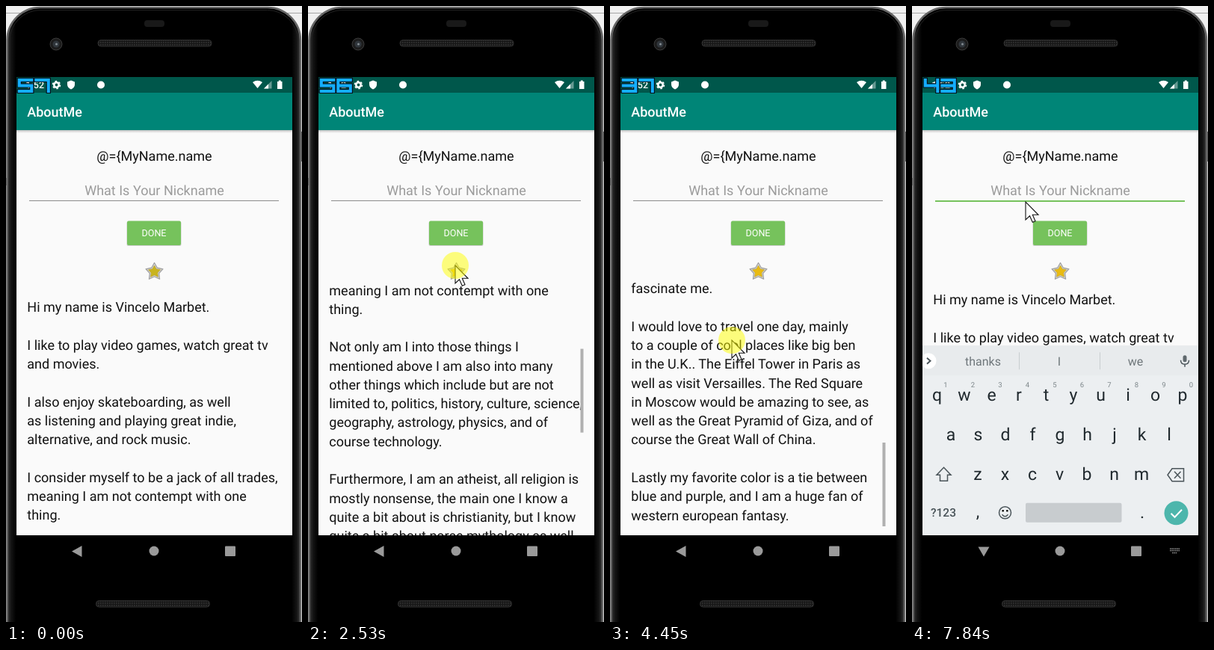
An HTML page that plays this animation: 396x824 px, repeating every 8000 ms.

```html
<!DOCTYPE html>
<html lang="en">
<head>
<meta charset="utf-8">
<title>AboutMe</title>
<style>
html, body { margin: 0; width: 100%; height: 100%; overflow: hidden; background: #f0f0f0; }
svg { display: block; width: 396px; height: 824px; }
text { font-family: Roboto, sans-serif; font-size: 18.02px; text-rendering: geometricPrecision; white-space: pre; }
.mid { text-anchor: middle; }
#keys text { text-anchor: middle; fill: #20292e; font-size: 23px; }
#keys .alt { font-size: 9.5px; fill: #7d868a; }
#keys .word { font-size: 16px; fill: #6f777b; }
#keys .icon { fill: none; stroke: #4a5459; stroke-width: 1.5; }
#count path { fill: none; vector-effect: non-scaling-stroke; stroke-linecap: square; stroke-linejoin: miter; }
</style>
</head>
<body>
<svg viewBox="0 0 396 824" xmlns="http://www.w3.org/2000/svg">
  <defs>
    <linearGradient id="body">
      <stop offset="0" stop-color="#3c3c3c"/>
      <stop offset=".012" stop-color="#161616"/>
      <stop offset=".03" stop-color="#000"/>
      <stop offset=".97" stop-color="#000"/>
      <stop offset=".988" stop-color="#161616"/>
      <stop offset="1" stop-color="#3c3c3c"/>
    </linearGradient>
    <linearGradient id="shade" x2="0" y2="1">
      <stop offset="0" stop-opacity=".22"/>
      <stop offset="1" stop-opacity="0"/>
    </linearGradient>
    <pattern id="mesh" width="3" height="3" patternUnits="userSpaceOnUse">
      <rect width="3" height="3" fill="#161616"/>
      <rect width="1.6" height="1.6" fill="#353535"/>
    </pattern>
    <clipPath id="view"><rect x="14" y="368" width="369" height="340"/></clipPath>
    <clipPath id="screen"><rect x="14" y="95" width="369" height="613"/></clipPath>
  </defs>

  <!-- phone -->
  <rect width="396" height="824" fill="#f0f0f0"/>
  <path d="M0 9.5H396" stroke="#a5a5a5"/>
  <path d="M0 230H3V240H0ZM393 168h3v40h-3z" fill="#555"/>
  <rect x="1.5" y="2" width="392.5" height="920" rx="44" fill="url(#body)" stroke="#666" stroke-width="2.500"/>
  <rect x="5" y="5.5" width="385.5" height="920" rx="41" fill="none" stroke="#222"/>
  <rect x="185" y="19" width="27" height="9" rx="4" fill="#191919"/>
  <g stroke="#303030"><rect x="123" y="45.5" width="152" height="8.5" rx="4" fill="url(#mesh)"/>
  <rect x="120.500" y="795.5" width="152" height="8.500" rx="4" fill="url(#mesh)"/></g>
  <circle cx="67" cy="51" r="8" fill="#1c1c1c" stroke="#3a3a3a"/>
  <circle cx="67" cy="51" r="4.500" fill="#30363c"/>
  <circle cx="67.500" cy="51" r="1.500" fill="#858d94"/>

  <!-- app -->
  <rect x="14" y="95" width="369" height="613" fill="#fafafa"/>
  <rect x="14" y="166" width="369" height="4" fill="url(#shade)"/>
  <rect x="14" y="116" width="369" height="50" fill="#008577"/>
  <rect x="14" y="95" width="369" height="21" fill="#00574b"/>
  <text x="28.200" y="148" fill="#fff" font-weight="500">AboutMe</text>
  <g fill="#fff">
    <text x="51" y="110" text-anchor="end" font-weight="500" style="font-size:12.5px">1:52</text>
    <circle cx="67.500" cy="105.500" r="3.200" fill="none" stroke="#fff" stroke-width="2.600"/>
    <circle cx="67.500" cy="105.500" r="5" fill="none" stroke="#fff" stroke-width="1.600" stroke-dasharray="2.600 2.636"/>
    <path d="M87 99.500L92 101.500V105Q92 109 87 111.500Q82 109 82 105V101.500Z"/>
    <circle cx="127" cy="105.500" r="5"/>
    <path d="M330 102Q336.500 97.500 343 102L336.500 110Z"/>
    <path d="M345 110.500L355.500 100V110.500Z" opacity=".4"/>
    <path d="M345 110.500L351 104.500V110.500Z"/>
    <path d="M363 101H364.800V99.500H367.700V101H369.500V111H363Z"/>
  </g>
  <text class="mid" x="198.500" y="207" fill="#111">@={MyName.name</text>
  <text class="mid" x="198.500" y="253" fill="#9b9b9b">What Is Your Nickname</text>
  <path id="line"/>
  <rect x="161.500" y="288.500" width="73" height="32.500" rx="2" opacity=".18"/>
  <rect x="162" y="287.500" width="72" height="32.500" rx="2" fill="#76c25c"/>
  <text class="mid" x="198" y="308.300" fill="#fff" style="font-size:12.6px">DONE</text>
  <g stroke-linejoin="round">
    <path id="rim" fill="#dedede" stroke="#a2a2a2" stroke-width="1.300"/>
    <path id="star" stroke="#b39a3c" stroke-width=".6"/>
  </g>
  <g clip-path="url(#view)">
    <g id="story" fill="#111"></g>
    <path id="glow" fill="#008577"/>
    <rect id="bar" x="364.500" width="4" height="112" fill="#b0b0b0"/>
  </g>

  <g clip-path="url(#screen)"><g id="keys"></g></g>

  <!-- navigation -->
  <g fill="#9a9a9a">
    <path id="back"/>
    <circle cx="198" cy="729" r="6.500"/>
    <rect x="293" y="722.500" width="14" height="13.500" rx="1"/>
    <path id="swap" d="M345 726H358M345 728.500H358M348 731.500H355" fill="none" stroke="#8a8a8a" stroke-width="1.500" stroke-dasharray="1.600 .7"/>
  </g>

  <g id="count"></g>
  <path id="mouse" d="M0 0V24L5.500 18.800L9.300 27.300L13 25.700L9.300 17.300H17Z" fill="#fff" stroke="#111" stroke-width="1.100"/>
  <circle id="press" r="18" fill="#ff0" opacity=".5"/>
</svg>
<script>
const $ = id => document.getElementById(id);
const set = (id, o) => { for (const k in o) $(id).setAttribute(k, o[k]); };
const clamp = v => Math.max(0, Math.min(1, v));
const ramp = (t, a, b) => clamp((t - a) / (b - a));

const LOOP = 8000, STEP = 76.85, START = 530;
const LINE = 25.28, TOP = 368, MAX = 657;

const story = `Hi my name is Vincelo Marbet.

I like to play video games, watch great tv
and movies.

I also enjoy skateboarding, as well
as listening and playing great indie,
alternative, and rock music.

I consider myself to be a jack of all trades,
meaning I am not contempt with one
thing.

Not only am I into those things I
mentioned above I am also into many
other things which include but are not
limited to, politics, history, culture, science,
geography, astrology, physics, and of
course technology.

Furthermore, I am an atheist, all religion is
mostly nonsense, the main one I know a
quite a bit about is christianity, but I know
quite a bit about norse mythology as well
as greek mythology, mainly because they
fascinate me.

I would love to travel one day, mainly
to a couple of cool places like big ben
in the U.K.. The Eiffel Tower in Paris as
well as visit Versailles. The Red Square
in Moscow would be amazing to see, as
well as the Great Pyramid of Giza, and of
course the Great Wall of China.

Lastly my favorite color is a tie between
blue and purple, and I am a huge fan of
western european fantasy.`;

$('story').innerHTML = story.split('\n').map((s, i) =>
  `<text x="28.3" y="${409.2 + i * LINE}">${s}</text>`).join('');

function starPath(cx, cy, r) {
  let d = '';
  for (let i = 0; i < 10; i++) {
    const a = i * Math.PI / 5, q = i % 2 ? r * .54 : r;
    d += (i ? 'L' : 'M') + (cx + q * Math.sin(a)) + ' ' + (cy - q * Math.cos(a));
  }
  return d + 'Z';
}
set('rim', { d: starPath(198.5, 355.5, 12) });
set('star', { d: starPath(198.5, 355.5, 8.5) });

function keyboard() {
  const txt = (x, y, s, c = '') => `<text x="${x}" y="${y}" class="${c}">${s}</text>`;
  let h = `<rect x="14" y="454" width="369" height="254" fill="#eceff1"/>
    <rect x="14" y="454" width="369" height="40" fill="#e8ebed"/>
    <circle cx="22" cy="474.5" r="10.500" fill="#fff"/>
    <path class="icon" d="M20 470.500L24.500 474.500L20 478.500" style="stroke-width:2"/>
    <path d="M143.500 463V486M251.500 463V486" stroke="#c8cdd0"/>
    <rect x="362.500" y="467" width="5" height="9" rx="2.500" fill="#5f686d"/>
    <path class="icon" d="M359.500 473.500Q359.500 479 365 479Q370.500 479 370.500 473.500M365 479V482.500"/>`;
  ['thanks', 'I', 'we'].forEach((s, i) => h += txt(95 + i * 102, 480.5, s, 'word'));
  [['qwertyuiop', 33.5, 528], ['asdfghjkl', 52, 581], ['zxcvbnm', 88, 634]].forEach(([row, x, y], r) =>
    [...row].forEach((s, i) => {
      h += txt(x + i * 36.5, y, s);
      if (!r) h += txt(x + 11.5 + i * 36.5, 510, (i + 1) % 10, 'alt');
    }));
  h += `<text x="42" y="683" style="font-size:15.5px;fill:#4a5459;font-weight:500">?123</text>`;
  h += txt(88, 684, ',') + txt(308, 685, '.');
  h += `<path class="icon" d="M42.500 617L52 627H47.500V635H37.500V627H33Z"/>
    <path class="icon" d="M342 627L348 618.500H363.500V635.500H348ZM351 622.500L359.500 631.500M359.500 622.500L351 631.500"/>
    <circle class="icon" cx="124.500" cy="677.500" r="8"/>
    <path class="icon" d="M120.500 680Q124.500 685 128.500 680"/>
    <circle cx="121.700" cy="675" r="1.300"/><circle cx="127.300" cy="675" r="1.300"/>
    <rect x="152" y="664.500" width="128.500" height="26" rx="2" fill="#c8cccf"/>
    <circle cx="353.500" cy="678" r="16" fill="#4db6ac"/>
    <path d="M346.500 678.500L351.500 683.500L361 673.500" fill="none" stroke="#fff" stroke-width="2"/>`;
  return h;
}
$('keys').innerHTML = keyboard();

const glyph = {
  3: 'M0 0H1V2H0M0 1H1', 4: 'M0 0V1H1M1 0V2', 5: 'M1 0H0V1H1V2H0',
  6: 'M1 0H0V2H1V1H0', 7: 'M0 0H1V2', 9: 'M1 1H0V0H1V2H0'
};
const counts = [[0, 57], [1750, 56], [2900, 49], [4250, 37], [5150, 45], [6200, 46], [7200, 45], [7660, 43]];
let shown = 0;
function count(t) {
  const n = counts.filter(c => c[0] <= t).pop()[1];
  if (n === shown) return;
  shown = n;
  $('count').innerHTML = [['#06121c', 6.4], ['#14aeff', 4]].map(([c, w]) =>
    [...String(n)].map((g, i) => `<path d="${glyph[g]}" stroke="${c}" stroke-width="${w}"
      transform="translate(${17.8 + i * 22.5} 98.9) scale(16.5 7.5)"/>`).join('')).join('');
}

// time, pointer x, pointer y, scroll offset
const track = [
  [300, 325, 705, 0], [380, 279, 626, 0], [460, 279, 626, 0], [850, 214, 480, 0],
  [1300, 217, 559, 0], [1630, 214, 622, 0], [2150, 203, 470, 152], [2530, 197, 347, 275.5],
  [2680, 192, 302, 320], [3000, 180, 550, 320], [3250, 176, 430, 440], [3530, 171, 291, 579.5],
  [3840, 166, 233, 637], [3910, 165, 214, MAX], [4063, 165, 214, MAX], [4300, 160, 400, MAX],
  [4450, 163, 447, MAX], [4800, 172, 640, 463], [5150, 178, 409, 463], [5530, 185, 591, 281.5],
  [5680, 188, 710, 162], [5950, 184, 480, 162], [6350, 178, 632, 10], [6600, 170, 279, 10],
  [6760, 163, 234, 10], [6840, 163, 234, 10], [7060, 156, 246, 10], [7200, 155, 247, 10],
  [7370, 152, 262, 10], [8000, 152, 262, 10]
];
const holds = [[850, 2680], [3000, 3890], [4380, 4800], [5150, 5700], [5950, 6350], [7050, 7180]];

const slope = (i, c) => (track[i + 1][c] - track[i][c]) / (track[i + 1][0] - track[i][0]);
function tangent(i, c) {
  if (i < 1 || i > track.length - 2) return 0;
  const a = slope(i - 1, c), b = slope(i, c);
  return a * b > 0 ? 2 * a * b / (a + b) : 0;
}
// monotone cubic between neighbouring rows
function at(t, c) {
  if (t <= track[0][0]) return track[0][c];
  let i = 0;
  while (i < track.length - 2 && track[i + 1][0] <= t) i++;
  const [p, q] = [track[i], track[i + 1]], w = q[0] - p[0], u = clamp((t - p[0]) / w), v = 1 - u;
  return p[c] * (1 + 2 * u) * v * v + q[c] * u * u * (3 - 2 * u)
    + w * (tangent(i, c) * u * v * v - tangent(i + 1, c) * u * u * v);
}

function draw(time) {
  const k = Math.floor((time - START + 5) / STEP);
  const t = Math.max(0, Math.round((START + k * STEP) / 10) * 10);
  const x = at(t, 1), y = at(t, 2), s = at(t, 3);

  const on = t >= 300;
  set('mouse', { transform: `translate(${x} ${y})`, visibility: on ? 'visible' : 'hidden' });
  const held = holds.some(([a, b]) => t >= a && t < b);
  set('press', { cx: x, cy: y, visibility: held ? 'visible' : 'hidden' });

  set('story', { transform: `translate(0 ${-s})` });
  set('bar', { y: TOP + s / MAX * 216, opacity: ramp(t, 820, 920) * (1 - ramp(t, 6850, 7130)) });

  const g = (ramp(t, 880, 1300) + .15 * ramp(t, 1300, 1630)) * (1 - ramp(t, 1630, 1860));
  set('glow', { d: `M28 ${TOP}H369V${TOP + 10 * g}Q198 ${TOP + 60 * g} 28 ${TOP + 10 * g}Z`, opacity: .1 * Math.min(1, g) });

  const focus = t >= 7130;
  set('line', focus ? { d: 'M31 261H365', stroke: '#76c25c', 'stroke-width': 2 }
    : { d: 'M31 260.5H365', stroke: '#8c8c8c', 'stroke-width': 1 });
  set('star', { fill: t < 2530 ? '#c9b41f' : '#e9bb12' });

  const up = 1 - ramp(t, 7530, 7840), open = t >= 7600;
  set('keys', { transform: `translate(0 ${254 * up * up})`, visibility: open ? 'visible' : 'hidden' });
  set('swap', { visibility: open ? 'visible' : 'hidden' });
  set('back', { d: open ? 'M88.500 723.500H103.500L96 736.500Z' : 'M101.500 722V737L88 729.500Z' });
  count(t);
}

const begin = performance.now();
function tick() {
  draw((performance.now() - begin) % LOOP);
  requestAnimationFrame(tick);
}
tick();
</script>
</body>
</html>
```
